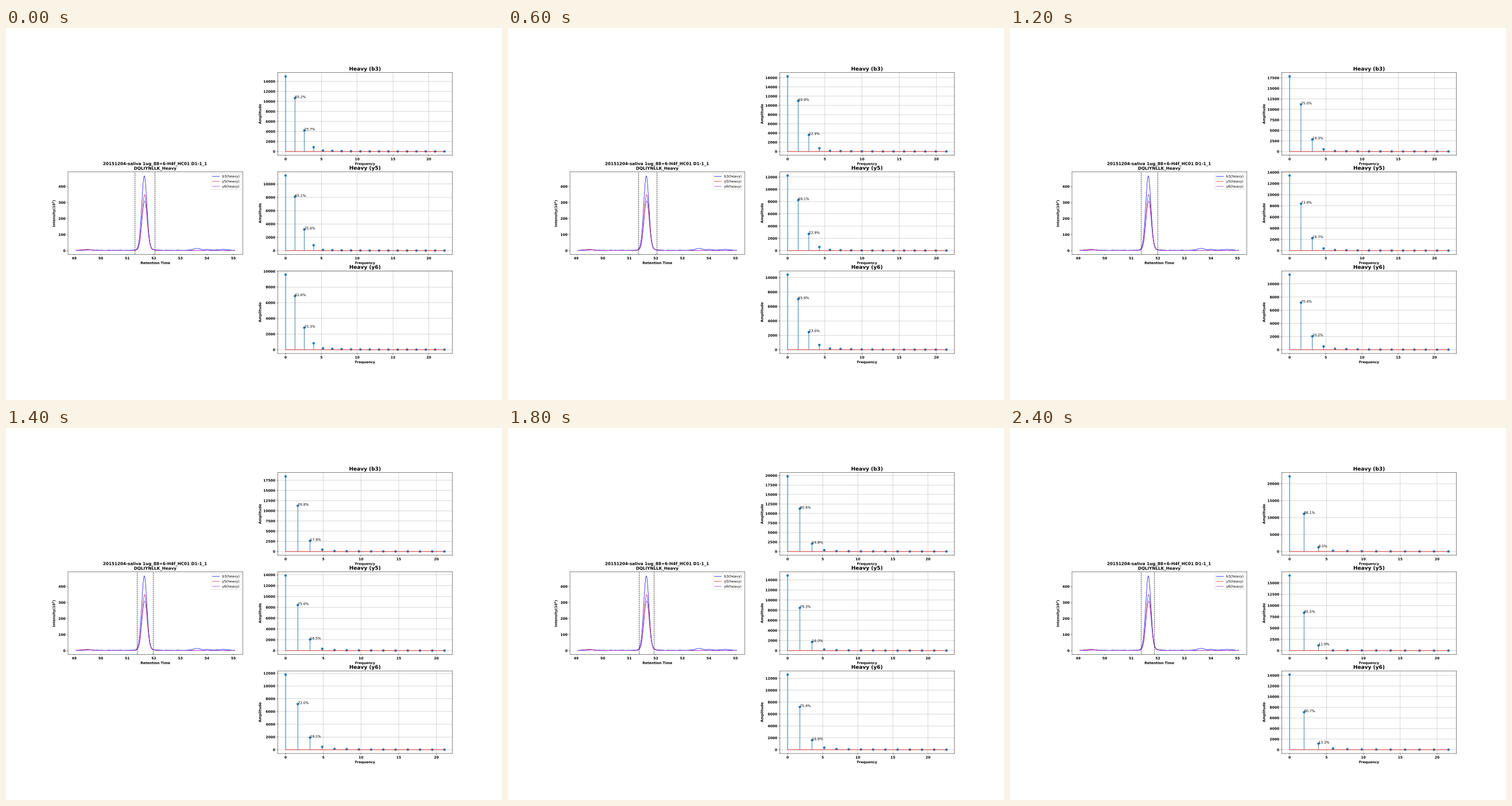
A matplotlib script that plays this animation: 864 by 648 pixels, repeating every 2600 ms.

```python
import numpy as np
import matplotlib.pyplot as plt
from matplotlib.animation import FuncAnimation
from matplotlib.patheffects import Normal

plt.rcParams.update({
    "font.family": "DejaVu Sans",
    "font.size": 10,
    "font.weight": "bold",
    "axes.labelweight": "bold",
    "axes.titleweight": "bold",
    "text.hinting": "none",
    # Outlined text and markers keep their sub-pixel positions.
    "path.snap": False,
    "path.effects": [Normal()],
})

FRAMES = 13
DT = 0.02128           # sampling step of the chromatogram
FIRST_SAMPLES = 36     # window length in the first frame


class Ion:
    """One fragment; the harmonic shares (%) are polynomials in the frame."""

    def __init__(self, color, center, height, area, overtones,
                 first, second, third):
        self.color, self.center, self.height = color, center, height
        self.area, self.overtones = area, overtones
        self.shares = [np.poly1d(c[::-1]) for c in (first, second, third)]

    def peak(self, t):
        tail = bell(t, self.center + 0.06, 0.025, 0.2)
        return self.height * (bell(t, self.center, 0.975, 0.0965) + tail)

    def spectrum(self, k):
        samples = FIRST_SAMPLES - k
        count = round(samples / 2)
        dc = self.area * (1 - 0.0013 * k) / samples
        total = dc * self.overtones * (1 - 0.0388 * k)
        main = [share(k) for share in self.shares]
        decay = 0.6 ** np.arange(count - 4) + 0.08
        tail = (100 - sum(main)) * decay / decay.sum()
        amps = total * np.append(main, tail) / 100
        return np.arange(count) / (samples * DT), np.append(dc, amps), main


def bell(x, center, height, sigma):
    return height * np.exp(-0.5 * ((x - center) / sigma) ** 2)


def ripple(x, size, phase):
    wave = np.sin(17 * x + phase) + np.sin(29 * x + 2 * phase) + np.sin(41 * x)
    return size * wave / 3


IONS = {
    "b3": Ion("blue", 51.641, 465, 540000, 1.090,
              (65.2, 1.53, 0.0175), (25.7, -0.792, -0.0465), (5.3, -0.3)),
    "y5": Ion("#c02020", 51.652, 350, 406000, 1.102,
              (65.1, 1.22, 0.04), (25.6, -0.83, -0.026), (6.5, -0.5)),
    "y6": Ion("blueviolet", 51.652, 310, 344800, 1.160,
              (61.6, 1.352, 0.02), (25.3, -0.71, -0.0242), (7.4, -0.4)),
}

fig = plt.figure(figsize=(20, 15), dpi=43.2, facecolor="white")
fig.subplots_adjust(left=0.125, right=0.9, bottom=0.125, top=0.88,
                    wspace=0.2, hspace=0.2)
chrom = fig.add_subplot(3, 2, 3)
panels = {name: fig.add_subplot(3, 2, 2 * row + 2)
          for row, name in enumerate(IONS)}

t = 49.065 + DT * np.arange(282)
background = {
    "b3": 2.4 + ripple(t, 1.2, 0.4) + bell(t, 49.5, 4, 0.15)
          + bell(t, 53.62, 11.5, 0.13) + bell(t, 54.02, 5, 0.12)
          + bell(t, 54.6, 5.5, 0.15),
    "y5": 1.2 + ripple(t, 0.8, 2.0) + bell(t, 49.48, 6.5, 0.14),
    "y6": 1.0 + ripple(t, 0.8, 4.1) + bell(t, 49.58, 3, 0.12),
}
for name, ion in IONS.items():
    chrom.plot(t, background[name] + ion.peak(t), color=ion.color, lw=1.2,
               label=f"{name}(heavy)")
chrom.set_xlim(48.767, 55.35)
chrom.set_ylim(-23.3, 491.6)
chrom.set_title("20151204-saliva 1ug_88+6-H4f_HC01 D1-1_1\nDQLIYNLLK_Heavy",
                fontsize=12)
chrom.set_xlabel("Retention Time")
chrom.set_ylabel("Intensity$(10^2)$")
chrom.legend(loc="upper right", prop={"weight": "normal", "size": 10})
left_edge, right_edge = (chrom.axvline(51.3, color="black", ls="--", lw=1.1)
                         for _ in range(2))


def update(k):
    # The window loses one sample per frame: first on the left, then the right.
    trimmed_left = min(k, 4)
    left_edge.set_xdata([51.293 + DT * trimmed_left] * 2)
    right_edge.set_xdata([52.046 - DT * (k - trimmed_left)] * 2)

    for name, ax in panels.items():
        freq, amps, shares = IONS[name].spectrum(k)
        ax.clear()
        ax.stem(freq, amps)
        for i in (1, 2):
            ax.text(freq[i], amps[i], f"{shares[i - 1]:.1f}%", weight="normal")
        ax.grid(True)
        ax.set_title(f"Heavy ({name})", fontsize=15)
        ax.set_xlabel("Frequency")
        ax.set_ylabel("Amplitude")
    return []


anim = FuncAnimation(fig, update, frames=FRAMES, init_func=lambda: [],
                     interval=200, repeat=True, repeat_delay=0, blit=False)
plt.show()
```
